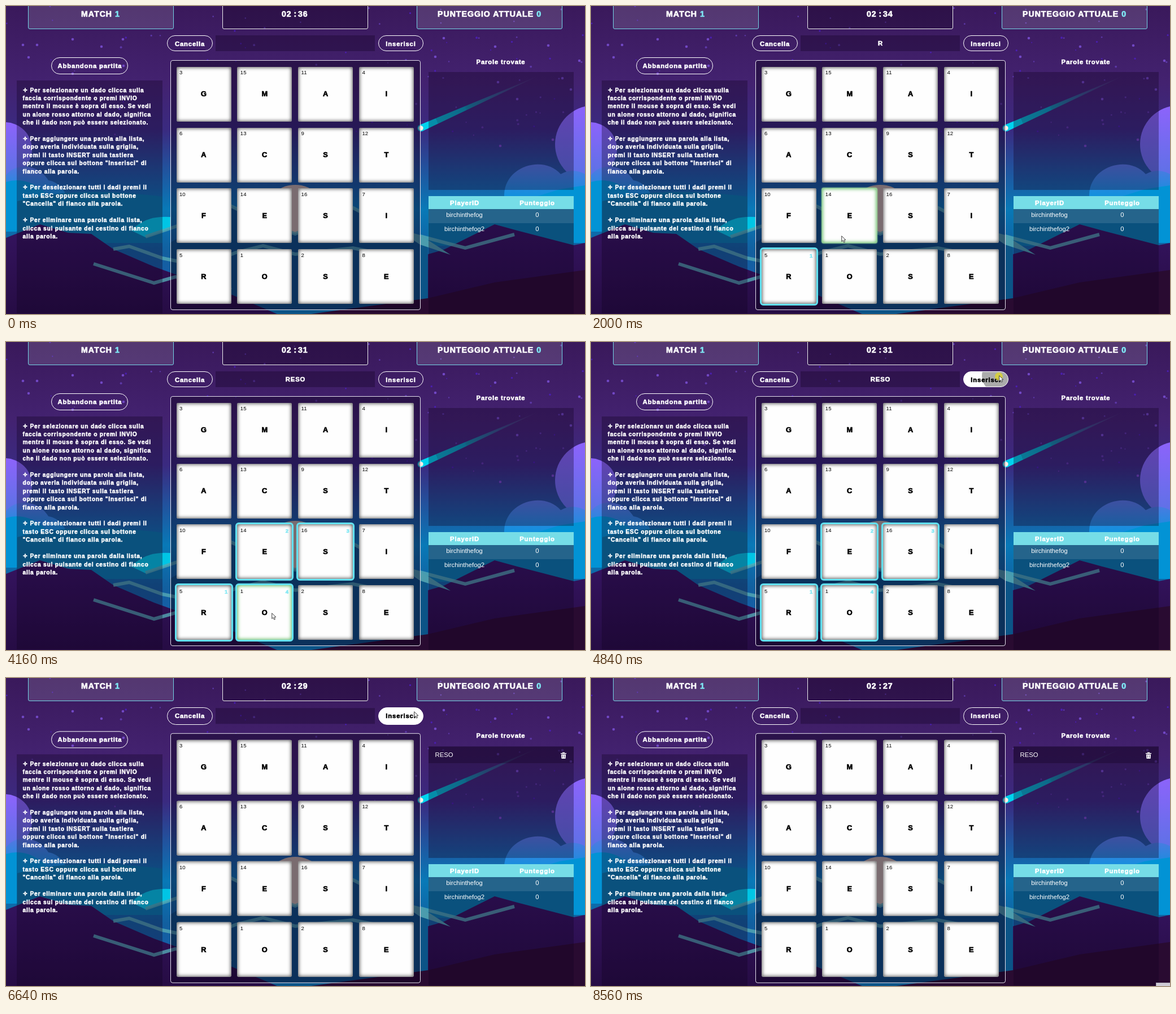
An HTML page for the animation above (8.65 s loop, 1025 px wide and 546 px high).

```html
<!DOCTYPE html>
<html lang="it">
<head>
<meta charset="utf-8">
<title>Gioco di parole</title>
<style>
html, body { margin: 0; width: 100%; height: 100%; overflow: hidden; background: #3b1a5e; }
#stage { position: relative; width: 1025px; height: 546px; overflow: hidden; color: #fff;
  font: 11.3px/20px "Liberation Sans", Arial, sans-serif; }
#stage > svg, div, p { position: absolute; box-sizing: border-box; }
p { margin: 0; white-space: pre; }
.c { transform: translateX(-50%); }
.k { font-weight: bold; letter-spacing: .073em; -webkit-text-stroke: .05em currentColor; }
.h { font-size: 14.1px; }
.h b, .badge { color: #7fe8f4; }
.body { font-size: 10.24px; line-height: 14.4px; }
.dark { background: rgba(18, 0, 32, .33); }
.head { border: 1px solid #74d5e6; border-radius: 0 0 3px 3px; background: rgba(255, 255, 255, .13); }
.timer { border-color: #eee; background: rgba(18, 0, 32, .3); }
.frame { border: 1px solid #e4e0ec; border-radius: 4px; background: rgba(14, 0, 30, .42); }
.btn { border: 1.5px solid #fff; border-radius: 16px; overflow: hidden; }
.tile { border-radius: 3px; background: #fefefe; color: #000; box-shadow: inset 0 0 6px 1px #555; }
.tile.on { outline: 3px solid #62e2f1; }
.tile.over { box-shadow: inset 0 0 6px 1px #5bb85b, 0 0 2px 1px #a4e6a0; }
.num { font-size: 9.6px; }
.letter { font-size: 12.8px; }
.badge { font-size: 9.6px; }
.cyan { background: #76dde7; }
.row { background: rgba(255, 255, 255, .11); }
.round { border-radius: 50%; }
</style>
</head>
<body>
<div id="stage">
<svg width="1025" height="546" viewBox="0 0 1025 546">
  <defs>
    <linearGradient id="sky" x2="0" y2="1">
      <stop offset="0" stop-color="#3a195b"/><stop offset=".25" stop-color="#432270"/>
      <stop offset=".4" stop-color="#3a2a80"/><stop offset=".52" stop-color="#23509c"/>
      <stop offset=".66" stop-color="#0879b7"/><stop offset=".8" stop-color="#125f9f"/>
      <stop offset="1" stop-color="#1c5db4"/>
    </linearGradient>
    <linearGradient id="violet" x2="0" y2="1">
      <stop offset="0" stop-color="#8d63fb"/><stop offset="1" stop-color="#5973e4"/>
    </linearGradient>
    <linearGradient id="blue" x2="0" y2="1">
      <stop offset="0" stop-color="#5577e2"/><stop offset="1" stop-color="#0296dc"/>
    </linearGradient>
    <linearGradient id="tail" gradientUnits="userSpaceOnUse" x1="734" y1="217" x2="940" y2="125">
      <stop offset=".14" stop-color="#00d3ee"/><stop offset=".14" stop-color="#08b4d0"/>
      <stop offset=".38" stop-color="#0b9dbd"/><stop offset=".4" stop-color="#138ba9"/>
      <stop offset="1" stop-color="#5b4a85" stop-opacity=".2"/>
    </linearGradient>
    <linearGradient id="hill" x2="0" y2="1">
      <stop offset="0" stop-color="#351460"/><stop offset="1" stop-color="#260c44"/>
    </linearGradient>
  </defs>
  <path fill="url(#sky)" d="M0 0H1025V546H0z"/>
  <g id="stars"></g>
  <g fill="url(#violet)"><circle cx="-2" cy="254" r="48"/><circle cx="1041" cy="245" r="69"/></g>
  <g fill="url(#blue)">
    <path d="M0 300C20 274 60 283 75 309C95 312 106 330 110 345H0z"/>
    <path d="M882 334C884 282 953 264 982 298Q1003 286 1025 298V350H882z"/>
  </g>
  <path fill="#0293d5" d="M0 312Q40 300 76 337H270V400H0zM900 350L980 325 1025 318V420H850z"/>
  <path fill="#0878ab" d="M20 346Q120 318 277 338V420H20zM747 355Q850 335 1005 350V425H747z"/>
  <path fill="#00c5e5" d="M222 398Q245 371 291 374V394L247 410z"/>
  <circle cx="512" cy="375" r="58" fill="#c9b9ab"/>
  <path fill="#0b5487" d="M290 420L399 354 455 382 512 404 615 358 690 403 747 425V546H290z"/>
  <path fill="url(#hill)" d="M0 411L60 387 110 402 151 404 190 431 262 462 400 512 480 546H0z"/>
  <path fill="url(#hill)" d="M747 440L775 432 865 387 905 398 1005 424 1025 420V546H747z"/>
  <g fill="none" stroke="#54a9b5" stroke-width="6" stroke-opacity=".8">
    <path d="M190 431L218 426 277 447 345 461 407 437 455 425 512 440 614 429 690 444"/>
    <path d="M155 457L262 491 300 480 399 503"/>
    <path d="M247 409L300 391 399 355 455 382 512 404 615 358 690 398"/>
    <path d="M733 408L813 429 900 405"/>
  </g>
  <path fill="#4b9cad" d="M690 394L733 406 787 441 733 423z"/>
  <path fill="#290b31" d="M540 546L747 518 865 490 1025 468V546z"/>
  <path fill="url(#tail)" d="M732 211L940 125 737 222z"/>
  <circle cx="734.500" cy="216.500" r="6" fill="#00cfeb"/>
  <circle cx="734.500" cy="216.500" r="4.200" fill="#f7f0e6"/>
</svg>
</div>
<script>
const LOOP = 8650, INSERT = 5000;
const stage = document.getElementById('stage');
const $ = id => document.getElementById(id);
const clamp = v => Math.max(0, Math.min(1, v));
const ramp = (t, a, b) => clamp((t - a) / (b - a));

const box = (x, y, w, h, cls = '', inner = '', id = '') =>
  `<div id="${id}" class="${cls}" style="left:${x}px;top:${y}px;width:${w}px;height:${h}px">${inner}</div>`;
// y is the middle of the line
const text = (x, y, s, cls = 'k c', id = '') =>
  `<p id="${id}" class="${cls}" style="left:${x}px;top:${y - 10}px">${s}</p>`;
const group = (id, inner) => box(0, 0, 0, 0, '', inner, id);

const help = `✧ Per selezionare un dado clicca sulla
faccia corrispondente o premi INVIO
mentre il mouse è sopra di esso. Se vedi
un alone rosso attorno al dado, significa
che il dado non può essere selezionato.

✧ Per aggiungere una parola alla lista,
dopo averla individuata sulla griglia,
premi il tasto INSERT sulla tastiera
oppure clicca sul bottone "Inserisci" di
fianco alla parola.

✧ Per deselezionare tutti i dadi premi il
tasto ESC oppure clicca sul bottone
"Cancella" di fianco alla parola.

✧ Per eliminare una parola dalla lista,
clicca sul pulsante del cestino di fianco
alla parola.`;

const letters = 'GMAIACSTFESIROSE';
const numbers = [3, 15, 11, 4, 6, 13, 9, 12, 10, 14, 16, 7, 5, 1, 2, 8];
const PITCH = 107.8, SIZE = 97;
const tileX = i => 301.5 + i % 4 * PITCH;
const tileY = i => 107.8 + (i >> 2) * PITCH;
const tiles = [...letters].map((l, i) => box(tileX(i), tileY(i), SIZE, SIZE, 'tile',
  text(5.5, 10.7, numbers[i], 'num') + text(48.9, 48.5, l, 'k c letter') +
  text(88.5, 12, '', 'k c badge'))).join('');

const player = (y, name) => text(811.5, y, name, 'c') + text(940.5, y, 0, 'c');
const bin = `<svg style="position:absolute;left:233px;top:9px" width="12" height="13">
  <path fill="#fff" d="M1 2H4V.800H8V2H11V3.500H1zM2 4.500H10L9.500 12H2.500z"/>
  <path stroke="#65577a" d="M4.500 6V10.500M7.500 6V10.500"/></svg>`;

stage.insertAdjacentHTML('beforeend',
  box(38.5, -20, 258, 61, 'head') + box(382.5, -20, 258, 61, 'head timer') +
  box(726.5, -20, 258, 61, 'head') +
  text(167.5, 14, 'MATCH <b>1</b>', 'k c h') +
  text(856, 14, 'PUNTEGGIO ATTUALE <b>0</b>', 'k c h') +
  text(488, 14, '02', 'k h') + text(509.5, 14, ':', 'k h') + text(517, 14, '', 'k h', 'sec') +
  box(371, 52, 282, 28, 'dark', '', 'field') + text(512.5, 66, '', 'k c', 'word') +
  box(285, 52, 80.5, 28, 'btn', '', 'cancel') +
  box(658.5, 52, 80.5, 28, 'btn', box(0, 0, 0, 0, 'round', '', 'ripple'), 'insert') +
  text(325.5, 67.3, 'Cancella') + text(699, 67.3, 'Inserisci', 'k c', 'insertText') +
  group('left', box(80, 90.5, 136, 30.5, 'btn') + text(148.5, 105.7, 'Abbandona partita') +
    box(19, 131.5, 258, 413, 'dark') + text(29.5, 152.6, help, 'k body')) +
  group('grid', box(290.5, 96.3, 443, 443, 'frame') + tiles) +
  group('title', text(876, 98.5, 'Parole trovate')) +
  box(747.5, 117, 257.5, 209, 'dark', '', 'list') +
  box(747.5, 121.5, 257.5, 29.5, 'dark', text(12, 14.7, 'RESO', '') + bin, 'found') +
  group('table', box(747.5, 337, 257.5, 215, 'dark') +
    box(747.5, 337, 257.5, 23, 'cyan') + box(747.5, 360, 257.5, 24.5, 'row') +
    text(812, 349, 'PlayerID') + text(940.5, 349, 'Punteggio') +
    player(370, 'birchinthefog') + player(395, 'birchinthefog2')) +
  box(0, 0, 14, 14, 'round', '', 'press') +
  box(0, 0, 9, 14, '', `<svg width="9" height="14"><path d="M.700.700V10.500L3 8.500 4.700 12.200 6.500 11.400 4.900 7.900 8 7.700z"
    fill="#f4f4f4" stroke="#333" stroke-width=".900"/></svg>`, 'cursor') +
  box(1000, 539.5, 26, 8, '', '', 'corner'));

$('press').style.background = 'rgba(226,216,36,.75)';
$('ripple').style.background = 'rgba(0,0,0,.33)';
$('corner').style.cssText += 'background:#cfccd6;border:1px solid #aaa6b4';

// Some placed stars, then small seeded ones
const stars = [[30, 69], [55, 69], [118, 59], [169, 72], [207, 59], [40, 91], [118, 120], [208, 106],
  [201, 182], [169, 108], [775, 57], [866, 72], [960, 70], [1015, 97], [985, 128], [1000, 148],
  [871, 135], [875, 248], [968, 237], [760, 90], [905, 165]];
let seed = 7;
const rnd = () => (seed = seed * 16807 % 2147483647) / 2147483647;
$('stars').innerHTML = stars.map(([x, y]) => `<circle cx="${x}" cy="${y}" r="2.300" fill="#7148c4"/>`).join('') +
  Array.from({ length: 90 }, () => `<circle cx="${rnd() * 1025}" cy="${rnd() * 235}" r="${1 + rnd()}"
    fill="${rnd() < .5 ? '#4a1fb0' : '#5c38a6'}"/>`).join('');

const path = [[380, 745, 546], [680, 386, 502], [840, 370, 494], [1540, 370, 494], [2000, 443, 407],
  [2560, 443, 407], [2920, 568, 383], [3400, 568, 383], [3740, 470, 480], [4160, 470, 480],
  [4540, 722, 59], [6640, 722, 59], [7020, 455, 270], [7250, 455, 270], [7410, 889, 510],
  [7900, 889, 510], [8050, 1020, 548]];
const clicks = [1370, 2310, 3000, 3800, 4770];
const picks = [[12, 1450], [9, 2400], [10, 3080], [13, 3870]];
const ticks = [140, 1070, 2070, 3070, 4070, 5060, 6010, 7000, 7960];
const tileEls = [...document.querySelectorAll('.tile')];

function pointer(t) {
  const i = path.findIndex(k => k[0] > t);
  if (i < 1) return [-50, -50];
  const [a, b] = [path[i - 1], path[i]];
  const p = ramp(t, a[0], b[0]), e = p * p * (3 - 2 * p);
  return [a[1] + (b[1] - a[1]) * e, a[2] + (b[2] - a[2]) * e];
}

const place = (id, x, y) => $(id).style.transform = `translate(${x}px,${y}px)`;
const show = (id, on) => $(id).style.visibility = on ? 'visible' : 'hidden';

function render(t) {
  const done = t >= INSERT ? 1 : 0;
  const [x, y] = pointer(t);
  const chosen = done ? [] : picks.filter(p => t >= p[1]).map(p => p[0]);

  $('sec').textContent = 36 - ticks.filter(k => t >= k).length;
  $('word').textContent = chosen.map(i => letters[i]).join('');
  tileEls.forEach((el, i) => {
    const n = chosen.indexOf(i) + 1;
    const dx = x - tileX(i), dy = y - tileY(i) - done * 1.8;
    el.classList.toggle('on', n > 0);
    el.classList.toggle('over', dx > 0 && dx < SIZE && dy > 0 && dy < SIZE);
    el.lastChild.textContent = n || '';
  });

  place('left', 0, done * 3.3);
  place('grid', 0, done * 1.8);
  place('title', 0, done * 3.3);
  place('table', 0, done * -7);
  place('field', 0, done * 1.3);
  $('cancel').style.height = $('insert').style.height = 28 + done * 2.7 + 'px';
  $('list').style.top = 117 + done * 4 + 'px';
  $('list').style.height = 209 - done * 11 + 'px';
  show('found', done);

  const lit = ramp(t, 4490, 4620) - ramp(t, 6690, 6840);
  $('insert').style.background = `rgba(255,255,255,${lit})`;
  $('insertText').style.color = lit > .5 ? '#000' : '#fff';
  const r = Math.max(0, t - 4775) * .46;
  $('ripple').style.cssText += `;left:${63 - r}px;top:${7 - r}px;width:${2 * r}px;height:${2 * r}px`;
  $('ripple').style.opacity = t < 4775 ? 0 : 1 - ramp(t, 5000, 5600);

  show('press', clicks.some(c => t >= c && t < c + 140));
  place('press', x - 7, y - 5);
  place('cursor', x, y);
  show('corner', t >= 8560);
}

const start = performance.now();
function frame() {
  render((performance.now() - start) % LOOP);
  requestAnimationFrame(frame);
}
frame();
</script>
</body>
</html>
```
